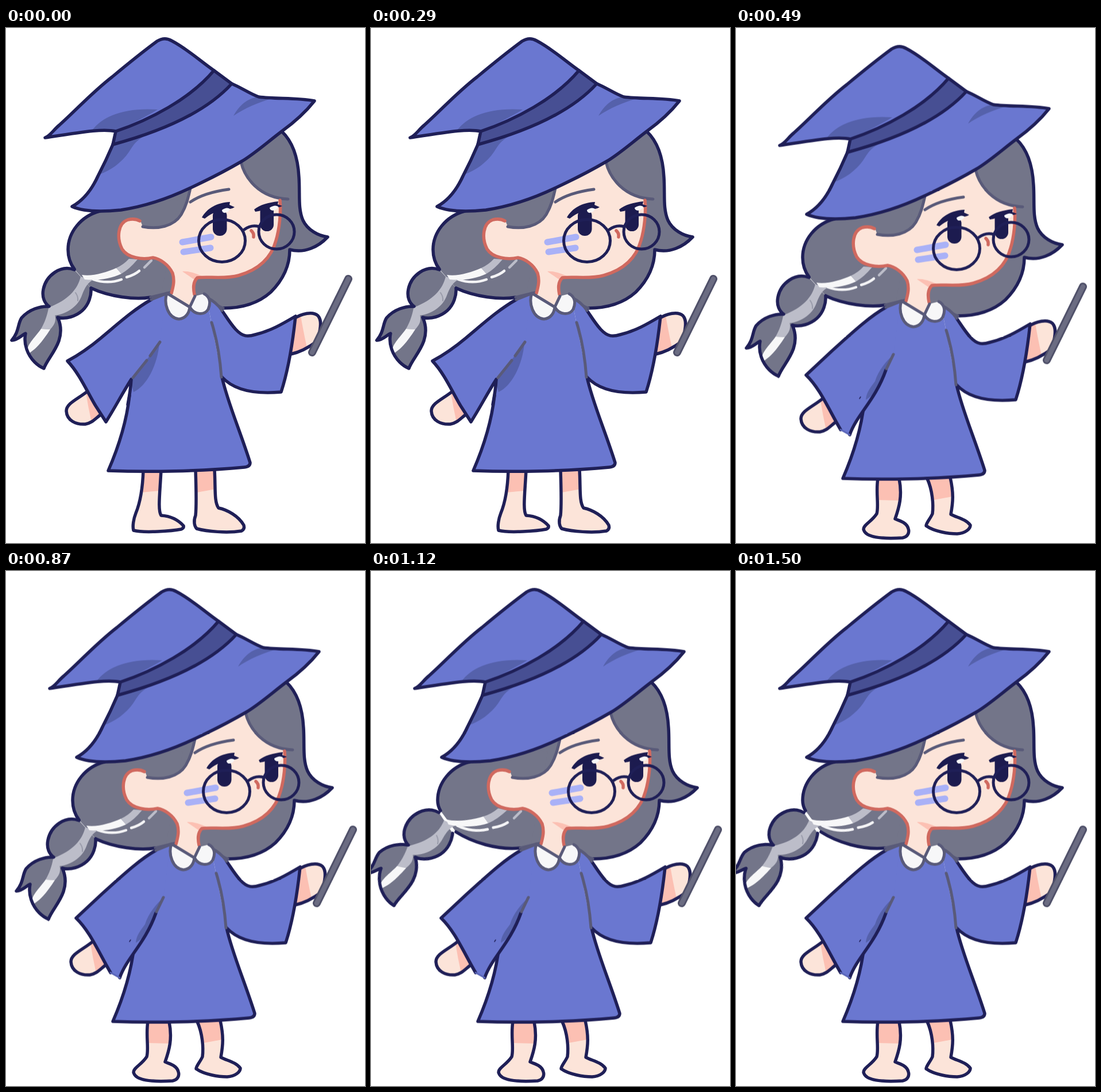
An HTML page that plays this animation: 625x897 px, repeating every 1.75 s.

```html
<!DOCTYPE html>
<html lang="en">
<head>
<meta charset="utf-8">
<title>Little witch</title>
<style>
  html, body { margin: 0; width: 100%; height: 100%; overflow: hidden; background: #fff; }
  svg { display: block; width: 100vw; height: 100vh; }
  path, ellipse { stroke-linecap: round; stroke-linejoin: round; }

  .blue { fill: #6a77d0; }
  .shade { fill: #5561ab; }
  .band { fill: #474f93; }
  .hair { fill: #737589; }
  .skin { fill: #fce4d9; }
  .pink { fill: #fcc0b3; }
  .white { fill: #f7f7f8; }
  .silver { fill: #bcbdc9; }
  .ink { fill: #1c1b4f; }
  .line { fill: none; stroke: #1f1f57; stroke-width: 5.5; }
  .soft { fill: none; stroke: #595a79; stroke-width: 5; }
  .red { fill: none; stroke: #d0695f; stroke-width: 5.5; }
  .blush { fill: none; stroke: #a9b1f7; stroke-width: 11; }
  .glass { stroke-width: 5; }

  .drop, .braid, .streak, .stand, .step, .rest, .swung { animation: 1750ms step-end infinite; }
  .drop { animation-name: drop; }
  .braid { animation-name: swing; }
  .streak { animation-name: lift; }
  .stand { animation-name: stand; }
  .step { animation-name: step; }
  .rest { animation-name: rest; }
  .swung { animation-name: swung; }
  @keyframes drop {
    0% { transform: translate(0, 0); }
    28%, 100% { transform: translate(8px, 13.5px); }
  }
  @keyframes swing {
    0% { transform: none; }
    64%, 100% { transform: translate(89px, 400px) rotate(8.6deg) translate(-97px, -417px); }
  }
  @keyframes lift {
    0% { transform: none; }
    64%, 100% { transform: translate(229px, 404px) rotate(7deg) scale(1.07) translate(-229px, -404px); }
  }
  @keyframes stand {
    0% { visibility: visible; }
    28%, 100% { visibility: hidden; }
  }
  @keyframes step {
    0% { visibility: hidden; }
    28%, 100% { visibility: visible; }
  }
  @keyframes rest {
    0% { visibility: visible; }
    64%, 100% { visibility: hidden; }
  }
  @keyframes swung {
    0% { visibility: hidden; }
    64%, 100% { visibility: visible; }
  }
</style>
</head>
<body>
<svg viewBox="0 0 625 897" preserveAspectRatio="none">
  <defs>
    <path id="legL" d="M239 770C238 800 233 828 226 845C222 855 220 868 222 875C240 880 290 876 305 873Q310 871 309 867C300 857 286 850 270 849C264 840 268 810 270 770"/>
    <path id="legR" d="M330 770C331 800 332 830 330 849C326 859 328 868 332 872C350 877 385 880 410 876Q416 873 414 866C405 850 385 839 370 836C362 825 365 800 363 770"/>
    <path id="stepL" d="M247 785C243 808 249 832 245 846C236 860 222 865 222 873C225 888 255 890 290 888C300 886 302 878 300 872C297 860 282 858 277 855C284 835 290 815 284 785"/>
    <path id="stepR" d="M333 785C342 805 344 830 342 846C338 855 331 862 331 867C345 877 370 881 385 881C400 880 408 872 408 866C400 855 385 853 374 847C378 825 379 810 373 783"/>
    <path id="backHair" d="M200 300L270 466L378 488C412 488 441 478 461 460C485 436 494 412 494 386C520 393 544 381 560 364C544 362 525 352 517 335C508 314 512 290 510 260C508 220 497 196 480 180L300 240Z"/>
    <path id="braid" d="M119 421C95 412 70 431 65 455C62 470 68 480 75 485C60 484 40 490 27 505C20 516 23 529 10 544C20 544 27 535 34 532C30 551 38 570 50 582Q57 589 66 593C70 580 85 565 92 545C97 530 95 515 90 504C104 508 122 502 133 492C144 482 149 466 148 453"/>
    <path id="handL" d="M144 631C128 645 105 653 105 667C106 684 122 691 138 690C150 688 156 680 164 674"/>
    <path id="handR" d="M500 507C515 497 534 493 543 501C551 510 548 526 541 546C525 558 510 565 496 568"/>
    <path id="sleeveR" d="M349 469C372 480 378 500 400 525C412 538 421 538 434 534C460 528 482 515 504 502C499 550 490 600 479 634C435 638 398 632 376 608"/>
    <path id="hat" d="M68 191C77 188 82 178 93 169C120 145 150 112 185 85C215 60 240 40 263 23Q276 15 288 22C315 36 335 55 362 74L393 97C410 104 425 115 440 120C470 124 505 121 537 127C522 146 505 162 480 180C450 203 430 221 409 233C380 250 350 265 320 279C280 298 240 311 200 317C170 320 135 320 115 311C135 300 150 280 160 258C172 235 180 217 186 203L191 180C170 175 140 180 68 191Z"/>
  </defs>

  <g class="stand">
    <use href="#legL" class="skin"/>
    <path class="pink" d="M238 770H270L267 806L236 809Z"/>
    <use href="#legL" class="line"/>
    <use href="#legR" class="skin"/>
    <path class="pink" d="M331 770H363L365 803L332 809Z"/>
    <use href="#legR" class="line"/>
  </g>
  <g class="step">
    <use href="#stepL" class="skin"/>
    <path class="pink" d="M247 785H284Q287 805 284 823L246 822Z"/>
    <use href="#stepL" class="line"/>
    <use href="#stepR" class="skin"/>
    <path class="pink" d="M333 785H373Q378 800 377 816L344 822Q343 802 333 785Z"/>
    <use href="#stepR" class="line"/>
  </g>

  <g class="drop">
    <use href="#backHair" class="hair"/>
    <g class="rest">
      <path class="hair" d="M163 319C130 328 108 356 108 386C108 400 113 412 119 420L148 453C180 468 225 474 270 466L300 300Z"/>
      <path class="line" d="M163 319C130 328 108 356 108 386C108 400 113 412 119 420M148 453C180 468 225 474 252 469"/>
    </g>
    <g class="swung">
      <path class="hair" d="M163 319C130 328 108 356 108 386C108 393 110 399 113 404L140 441C172 460 218 476 270 466L300 300Z"/>
      <path class="line" d="M163 319C130 328 108 356 108 386C108 393 110 399 113 404M140 441C168 459 212 473 252 469"/>
    </g>
    <path class="line" d="M378 488C412 488 441 478 461 460C485 436 494 412 494 386C520 393 544 381 560 364C544 362 525 352 517 335C508 314 512 290 510 260C508 220 497 196 480 180"/>
    <path class="soft" d="M252 469L285 461M378 488L364 482"/>

    <g class="braid">
      <use href="#braid" class="hair"/>
      <path class="silver" d="M130 433C125 455 108 474 74 487L76 501C102 502 125 486 132 466C137 452 143 443 151 439Z"/>
      <path class="silver" d="M74 488C72 500 67 514 61 524L77 525C87 514 87 508 85 498Z"/>
      <path class="white" d="M61 524C50 540 35 551 36 569C52 560 62 548 77 525Z"/>
      <path d="M121 461Q126 468 125 475" fill="none" stroke="#999baa" stroke-width="2"/>
      <use href="#braid" class="line"/>
    </g>

    <g class="streak">
      <path class="white" d="M132 430C150 433 174 426 192 418L201 428C182 437 160 440 137 438Z"/>
      <path class="silver" d="M192 418Q205 412 214 402L229 403Q215 420 201 428Z"/>
      <path d="M152 438C172 445 190 442 201 438M210 434Q224 430 232 423" fill="none" stroke="#f4f4f6" stroke-width="4.5"/>
    </g>
    <path d="M241 417L253 405" fill="none" stroke="#bcbdc9" stroke-width="4.5"/>

    <path class="skin" d="M321 277L409 233C415 258 436 288 478 296C479 322 476 350 470 370C462 400 440 421 405 431C380 438 350 432 333 435C325 444 327 456 328 466L320 492L286 470C293 455 294 441 290 427C283 412 268 402 256 400C238 404 212 401 202 385C192 365 195 340 212 334Q226 331 235 338L238 346C264 351 292 346 305 325C315 308 318 292 321 277Z"/>
    <path class="pink" d="M307 424C320 423 332 428 341 432L329 439Q320 433 307 424Z"/>
    <path class="soft" d="M321 279C318 292 315 308 305 325C292 346 264 351 238 346M409 233C415 260 440 296 491 298"/>
    <path class="red" d="M233 336Q224 331 212 334C195 340 192 365 202 385C212 401 238 404 256 400C268 402 283 412 290 427C294 440 291 451 288 462M477 300C479 322 476 350 470 370C462 400 440 421 405 431C380 438 350 432 333 435C325 443 326 454 328 464"/>
    <path class="blush" d="M307 373L357 364M309 390L356 383"/>

    <path class="soft" d="M321 303C340 290 365 284 388 281"/>
    <g class="ink">
      <path d="M341 330C350 314 367 304 390 303L389 308L398 312Q391 317 384 314L372 320C362 320 354 326 346 332Z"/>
      <rect x="360" y="315" width="24.5" height="47" rx="12"/>
      <path d="M432 316C442 308 456 304 474 302L473 307L481 310Q474 314 467 311L457 316C449 316 442 319 434 320Z"/>
      <rect x="442.5" y="308" width="23.5" height="46" rx="11.5"/>
    </g>
    <path class="white" d="M376 317Q384 311 390 315Q387 322 380 322Q376 321 376 317ZM459 313Q468 307 474 311Q472 317 464 318Q459 317 459 313Z"/>
    <path class="red" d="M427 353Q432 357 431 364"/>
    <g class="line glass">
      <ellipse cx="376" cy="370.5" rx="40.5" ry="37"/>
      <ellipse cx="471" cy="355" rx="31" ry="30"/>
      <path d="M415 351Q427 342 441 346"/>
    </g>

    <use href="#handL" class="skin"/>
    <path class="pink" d="M139 635Q143 660 149 687Q158 680 166 674L146 636Z"/>
    <use href="#handL" class="line"/>
    <use href="#handR" class="skin"/>
    <path class="pink" d="M500 507L513 501Q518 530 524 557L496 568Z"/>
    <use href="#handR" class="line"/>

    <path class="blue" d="M278 463L319 488L349 469L376 608C385 650 407 700 425 757Q425 764 415 765C340 772 250 774 178 771C200 720 214 665 218 612Z"/>
    <path class="line" d="M376 608C385 650 407 700 425 757Q425 764 415 765C340 772 250 774 178 771C198 725 210 685 215 640"/>
    <use href="#sleeveR" class="blue"/>
    <path class="line" d="M376 492C383 502 390 514 400 525C412 538 421 538 434 534C460 528 482 515 504 502C499 550 490 600 479 634C435 638 398 632 376 608"/>
    <path class="soft" d="M349 469Q367 478 376 492M358 513C368 545 373 580 375 608"/>

    <g class="stand">
      <path class="blue" d="M278 463C240 478 200 511 165 540C140 561 118 574 107 580C128 602 142 635 156 658L174 686C190 661 202 637 218 612L268 547Z"/>
      <path class="shade" d="M267 549C264 586 245 624 222 634L217 614Z"/>
      <path class="line" d="M253 473C221 491 193 517 165 540C140 561 118 574 107 580C128 602 142 635 156 658L174 686C190 661 202 637 218 612Q217 630 212 656"/>
      <path class="soft" d="M278 463L253 473M268 547L251 571M245 579L221 609"/>
    </g>
    <g class="step">
      <path class="blue" d="M278 463C235 480 190 522 160 548C142 565 128 578 114 591C138 614 152 648 174 686L190 695C202 660 234 636 253 582L266 555Z"/>
      <path class="shade" d="M266 555C254 567 240 582 234 602C226 613 219 621 218 634C234 626 247 602 253 582Z"/>
      <path class="line" d="M253 473C221 491 187 524 160 548C142 565 128 578 114 591C138 614 152 648 174 686M190 695C202 660 234 636 253 582"/>
      <path d="M174 686L190 695" fill="none" stroke="#5965b8" stroke-width="3"/>
      <path class="soft" d="M278 463L253 473M266 555L254 580"/>
      <path d="M207 632L209 629" fill="none" stroke="#1f1f57" stroke-width="1.5"/>
    </g>

    <path class="white" d="M280 462C274 480 282 505 301 507C313 506 319 496 320 486ZM329 467L320 486C328 500 345 501 352 490C358 476 353 467 345 463"/>
    <path class="soft" d="M280 462C274 480 282 505 301 507C313 506 319 496 320 486L282 463M329 467L320 486C328 500 345 501 352 490C358 476 353 467 345 463"/>

    <path d="M596 437L533 565" fill="none" stroke="#4f5069" stroke-width="14"/>
    <path d="M596 437L533 565" fill="none" stroke="#6b6c82" stroke-width="8"/>

    <use href="#hat" class="blue"/>
    <path class="shade" d="M150 178C168 154 205 138 264 142C240 157 215 168 191 180Q170 176 150 178ZM186 203L240 189C226 196 221 205 214 216C201 235 181 249 162 255ZM396 153C406 135 420 122 440 120L466 122C440 129 415 140 396 153Z"/>
    <path class="band" d="M191 180C250 160 320 124 362 74L393 97C345 150 260 183 186 203Z"/>
    <path class="line" d="M191 180C250 160 320 124 362 74M393 97C345 150 260 183 186 203"/>
    <use href="#hat" class="line"/>
  </g>
</svg>
</body>
</html>
```
